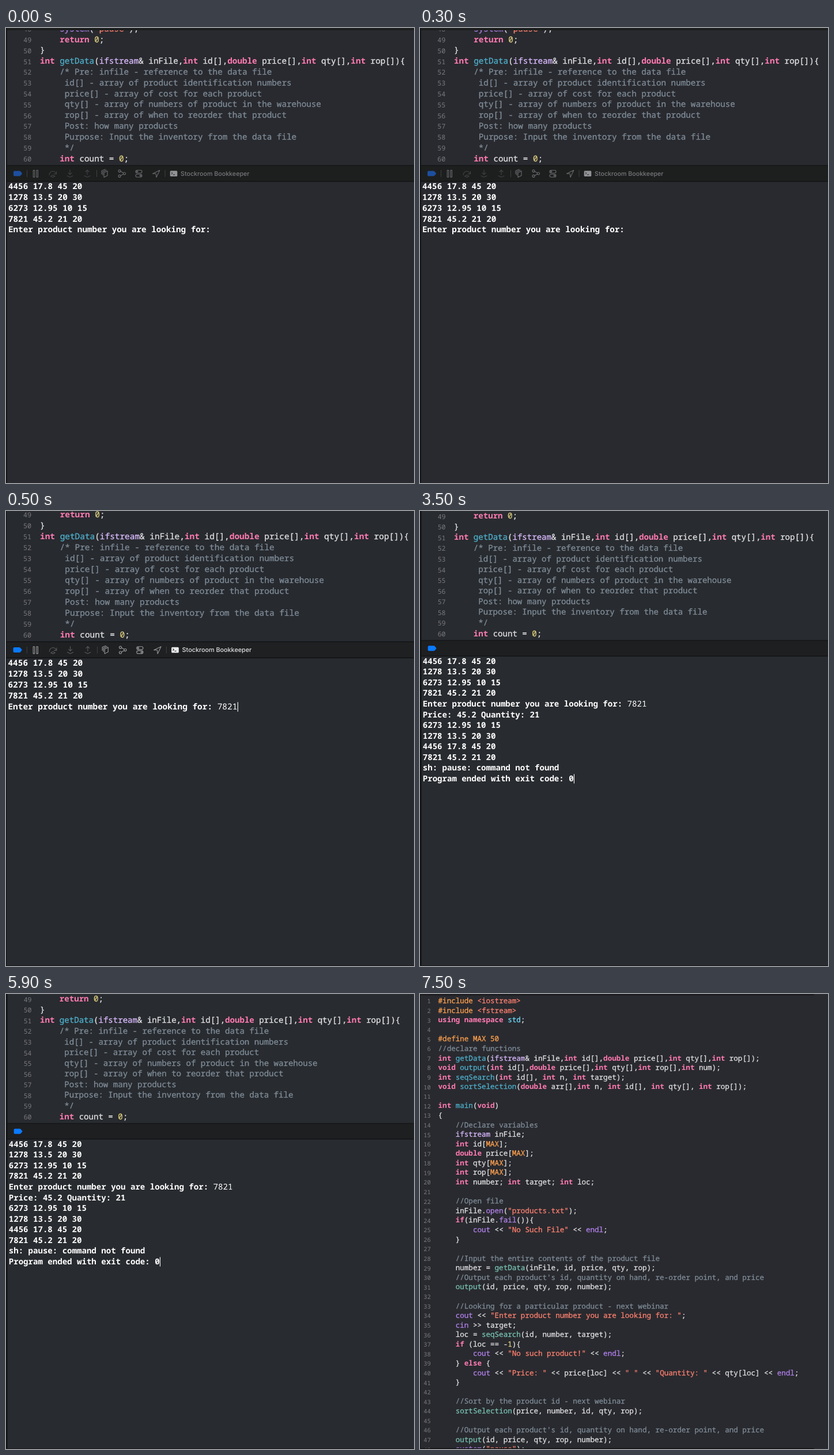
An HTML page that plays this animation: 708 px wide and 791 px high, repeating every 8 s.

```html
<!DOCTYPE html>
<html lang="en">
<head>
<meta charset="utf-8">
<title>Debug console</title>
<style>
  html, body { margin: 0; width: 100%; height: 100%; overflow: hidden; background: #292a2f; }
  svg { display: block; width: 708px; height: 791px; }
  text { font: 500 14.28px "Noto Sans Mono", monospace; white-space: pre; color: #e2e2e4; text-rendering: geometricPrecision; }
  text, tspan { fill: currentColor; }
  #code text, #code tspan { stroke: currentColor; stroke-width: 0.32; }
  #code .num { font-size: 11.7px; font-weight: 400; color: #797a7f; text-anchor: end; stroke: none; }
  #code .key { color: #ff7ab2; font-weight: 700; stroke: none; }
  .com { color: #7f8c98; }
  .pre { color: #ffa14f; }
  .str { color: #ff8170; }
  .val { color: #d9c97c; }
  .typ { color: #dabaff; }
  .lib { color: #b281eb; }
  .dec { color: #4eb0cc; }
  .fun { color: #78c2b3; }
  .std { color: #6bdfff; }
  #out text { color: #fff; font-weight: 700; }
  #out .typed { font-weight: 500; }
  #label { font: 500 10.7px Inter, Roboto, sans-serif; }
  #icons, #steps, #pause { fill: none; stroke-width: 1.1; stroke-linecap: round; stroke-linejoin: round; }
</style>
</head>
<body>
<svg viewBox="0 0 708 791">
  <rect id="bg" width="708" height="791"/>
  <g id="cam">
    <g id="code"></g>
    <g id="panel">
      <rect id="top" x="-5" y="-20" width="740" height="24"/>
      <rect id="floor" x="-5" y="240" width="740" height="600"/>
      <rect id="bar" x="-5" y="239" width="740" height="28"/>
      <path d="M-5 239H735M-5 266.600H735" stroke="#0e0f10" stroke-width="1.2"/>
      <path id="tag" d="M15 248.5h8.5q1 0 1.6.7l2.6 3.1q.6.7 0 1.4l-2.6 3.1q-.6.7-1.6.7H15q-2 0-2-2v-5q0-2 2-2z"/>
      <g id="tools">
        <path d="M36.5 247v12M157.5 247v12M276 247v12" stroke="#3f4042"/>
        <path id="pause" d="M47.3 247.2h2.4v12h-2.4zM53 247.2h2.4v12H53z"/>
        <path id="steps" d="M75 255.5q1-6 6-6.5q4 0 6 4.5M87.5 249.5v4.3h-4.3M77.5 257.8l3.7-2 3.7 2-3.7 1.7zM111 246.8v8m-3-3 3 3 3-3M106 257l5 2.3 5-2.3M141 255v-8m-3 3 3-3 3 3M136 257l5 2.3 5-2.3"/>
        <g id="icons">
          <path d="M170 251.5l6-3v8l-6 3zM168 255.8v-5.8l6-3M166 253.8v-5.6l6-2.4"/>
          <path d="M199 249.3l4.6 2.6M199 256.6l4.6-2.6"/>
          <circle cx="197" cy="248.6" r="2"/><circle cx="197" cy="257.4" r="2"/><circle cx="205.4" cy="253" r="2"/>
          <rect x="225" y="247.3" width="11" height="5" rx="2.5"/><rect x="225" y="254.3" width="11" height="5" rx="2.5"/>
          <circle cx="227.6" cy="249.8" r="1.2"/><circle cx="233.4" cy="256.8" r="1.2"/>
          <path d="M254.5 253.2l12.3-6-5.8 12.4-.8-6.4z"/>
        </g>
        <rect id="term" x="284.7" y="248.3" width="12.6" height="9.6" rx="1.5"/>
        <path d="M287 250.8l2 1.7-2 1.7M290 255h3" fill="none" stroke="#1d1f1f"/>
        <text id="label" x="303" y="256.8">Stockroom Bookkeeper</text>
      </g>
      <g id="out"></g>
      <rect id="caret" width="1.1" height="16.5" fill="#fff"/>
    </g>
    <rect id="edge" x="-5" y="-20" width="6.7" height="860" fill="#101113"/>
  </g>
  <g id="frame">
    <rect width="684" height="2.5" fill="#1c1c20"/>
    <rect y="789.5" width="684" height="1.5" fill="#101013"/>
    <rect width="1" height="791" fill="#141518"/>
  </g>
  <rect id="foot" y="790" width="708" height="1" fill="#17181a"/>
</svg>
<script>
const $ = id => document.getElementById(id);
const LOOP = 8000, PITCH = 18.82, COL = 8.568;

const program = `#include <iostream>
#include <fstream>
using namespace std;

#define MAX 50
//declare functions
int getData(ifstream& inFile,int id[],double price[],int qty[],int rop[]);
void output(int id[],double price[],int qty[],int rop[],int num);
int seqSearch(int id[], int n, int target);
void sortSelection(double arr[],int n, int id[], int qty[], int rop[]);

int main(void)
{
    //Declare variables
    ifstream inFile;
    int id[MAX];
    double price[MAX];
    int qty[MAX];
    int rop[MAX];
    int number; int target; int loc;

    //Open file
    inFile.open("products.txt");
    if(inFile.fail()){
        cout << "No Such File" << endl;
    }

    //Input the entire contents of the product file
    number = getData(inFile, id, price, qty, rop);
    //Output each product's id, quantity on hand, re-order point, and price
    output(id, price, qty, rop, number);

    //Looking for a particular product - next webinar
    cout << "Enter product number you are looking for: ";
    cin >> target;
    loc = seqSearch(id, number, target);
    if (loc == -1){
        cout << "No such product!" << endl;
    } else {
        cout << "Price: " << price[loc] << " " << "Quantity: " << qty[loc] << endl;
    }

    //Sort by the product id - next webinar
    sortSelection(price, number, id, qty, rop);

    //Output each product's id, quantity on hand, re-order point, and price
    output(id, price, qty, rop, number);
    system("pause");
    return 0;
}
int getData(ifstream& inFile,int id[],double price[],int qty[],int rop[]){
    /* Pre: infile - reference to the data file
     id[] - array of product identification numbers
     price[] - array of cost for each product
     qty[] - array of numbers of product in the warehouse
     rop[] - array of when to reorder that product
     Post: how many products
     Purpose: Input the inventory from the data file
     */
    int count = 0;`.split("\n");

const prompt = "Enter product number you are looking for: ";
const output = ["4456 17.8 45 20", "1278 13.5 20 30", "6273 12.95 10 15", "7821 45.2 21 20", prompt,
  "Price: 45.2 Quantity: 21", "6273 12.95 10 15", "1278 13.5 20 30", "4456 17.8 45 20", "7821 45.2 21 20",
  "sh: pause: command not found", "Program ended with exit code: 0"];

const grammar = new RegExp([
  "(?<com>\\/\\/.*)", "(?<str>\"[^\"]*\"|<\\w+>)", "(?<pre>#include|#define.*|\\bMAX\\b)",
  "(?<key>\\b(?:int|double|void|using|namespace|if|else|return)\\b)", "(?<val>\\b\\d+)",
  "(?<typ>\\bifstream\\b)", "(?<std>\\bstd\\b)", "(?<lib>\\b(?:cout|cin|endl|open|fail|system)\\b)",
  "(?<dec>(?<=^(?:int|void) )\\w+)", "(?<fun>\\b(?:getData|output|seqSearch|sortSelection)\\b)"
].join("|"), "g");

const esc = s => s.replace(/&/g, "&amp;").replace(/</g, "&lt;");
const span = (cls, s) => `<tspan class="${cls}">${esc(s)}</tspan>`;
const text = (x, y, body, cls = "") => `<text x="${x}" y="${y}" class="${cls}">${body}</text>`;

function paint(line) {
  let html = "", pos = 0;
  for (const m of line.matchAll(grammar)) {
    const cls = Object.keys(m.groups).find(k => m.groups[k] !== undefined);
    html += esc(line.slice(pos, m.index)) + span(cls, m[0]);
    pos = m.index + m[0].length;
  }
  return html + esc(line.slice(pos));
}

let block = false;
$("code").innerHTML = program.map((line, i) => {
  const y = 24.5 + (i - 48) * PITCH;
  if (line.includes("/*")) block = true;
  const body = block ? span("com", line) : paint(line);
  if (line.includes("*/")) block = false;
  return text(44.3, y + 0.4, i + 1, "num") + text(59, y, body);
}).join("");

const rowY = row => 280.2 + row * PITCH;
$("out").innerHTML = output.map((line, i) =>
  text(4, rowY(i), line + (line === prompt ? '<tspan class="typed">7821</tspan>' : ""))).join("");
const rows = [...$("out").children], typed = document.querySelector(".typed");

const dim = { tag: "#1d4f9f", pause: "#6a6b6d", steps: "#404143", icons: "#6a6b6d", term: "#929394", label: "#77787a" };
const lit = { tag: "#0a7aff", pause: "#98999b", steps: "#58595b", icons: "#98999b", term: "#eaeaeb", label: "#e0e0e2" };

const scenes = [
  { from: 0, zoom: 1, x: 0, y: 0, bg: "#292a2f", bar: "#1d1f1f", look: dim, rows: 5, tools: true },
  { from: 500, zoom: 1.0105, x: -0.6, y: -14.1, bg: "#272a2f", bar: "#1e2022", look: lit, rows: 5, tools: true, caret: [4, 46] },
  { from: 3500, zoom: 0.987, x: 0.8, y: -10.9, bg: "#282b2f", bar: "#1e1f21", look: lit, rows: 12, caret: [11, 31] },
  { from: 7500, zoom: 0.8808, x: -20.4, y: 790.2, bg: "#292a2f", bar: "#1d1f1f", look: lit, rows: 0, full: true }
];

const show = (el, on) => el.setAttribute("display", on ? "inline" : "none");
const fill = (id, color) => $(id).setAttribute("fill", color);

function draw(t) {
  const s = scenes.findLast(v => t >= v.from);
  $("cam").setAttribute("transform", `translate(${s.x} ${s.y}) scale(${s.zoom})`);
  fill("bg", s.bg);
  fill("floor", s.bg);
  fill("bar", s.bar);
  fill("top", s.bar);
  fill("tag", s.look.tag);
  fill("term", s.look.term);
  $("label").style.color = s.look.label;
  for (const id of ["pause", "steps", "icons"]) $(id).setAttribute("stroke", s.look[id]);
  show($("panel"), !s.full);
  show($("edge"), !s.full);
  show($("frame"), s.full);
  show($("foot"), s.caret);
  show($("tools"), s.tools);
  rows.forEach((row, i) => show(row, i < s.rows));
  typed.style.display = s.caret ? "" : "none";
  show($("caret"), s.caret);
  if (s.caret) {
    $("caret").setAttribute("x", 4 + s.caret[1] * COL);
    $("caret").setAttribute("y", rowY(s.caret[0]) - 12.8);
  }
}

const begin = performance.now();
function tick() {
  draw((performance.now() - begin) % LOOP);
  requestAnimationFrame(tick);
}
tick();
</script>
</body>
</html>
```
